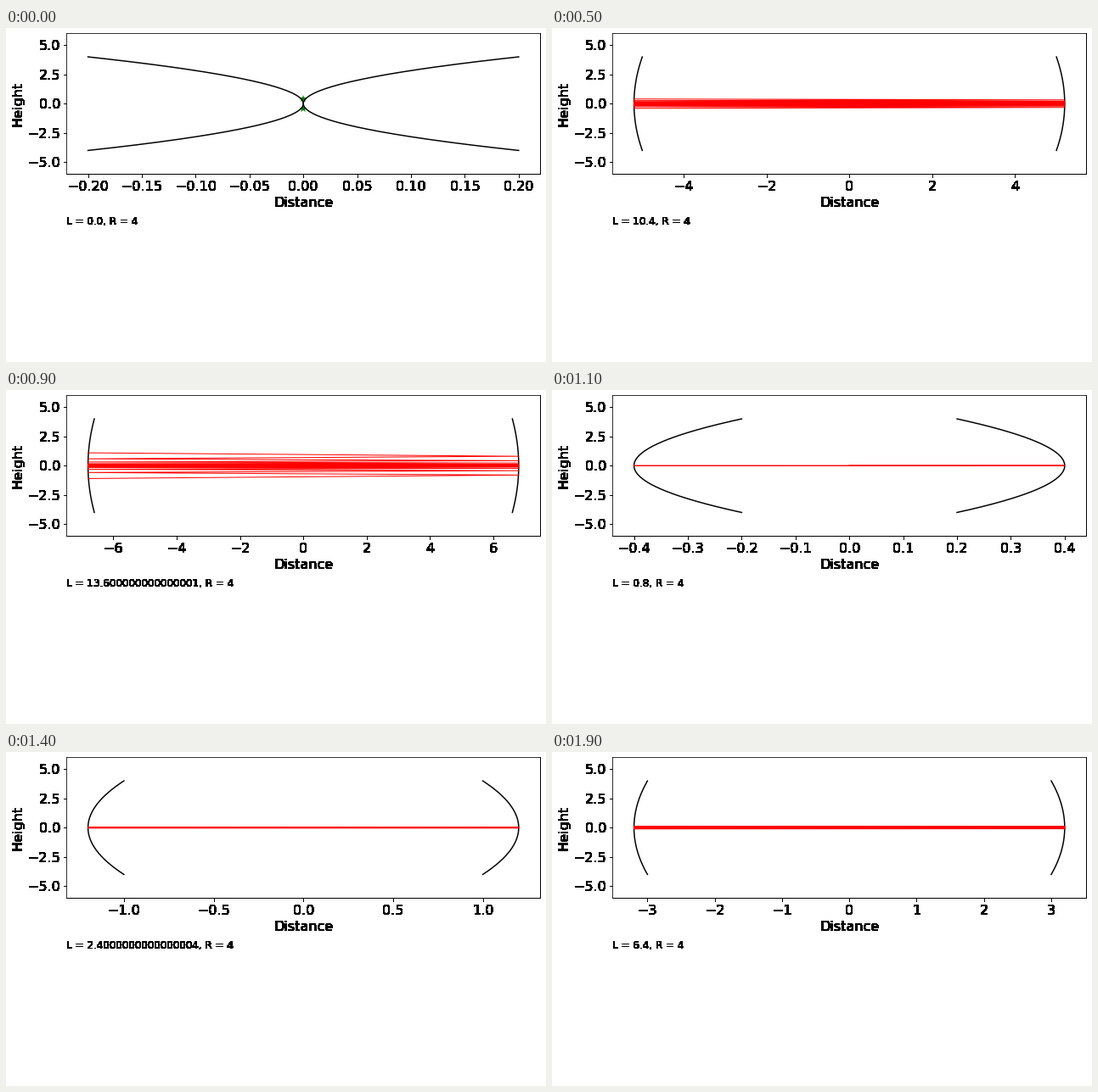
These frames come from a looping animation (636x394 px, 2 s). A matplotlib script:

```python
import numpy as np
import matplotlib.pyplot as plt
from matplotlib.animation import FuncAnimation

W, H, DPI = 636, 394, 72
LEFT, BOTTOM, WIDTH, HEIGHT = 71.2, 221.95, 558, 165.6
STEP = 0.8
RADIUS = 4
BOUNCES = 12

plt.rcParams.update({"font.family": "DejaVu Sans", "font.size": 16})

# Cavity steps play in alphabetical order of their 1-based number.
order = sorted(range(20), key=lambda i: str(i + 1))


def harden(img, dpi):
    """Give every touched pixel full ink, for hard-edged lettering."""
    out = img.copy()
    out[..., :3] = 0
    out[..., 3] = img[..., 3] > 0
    return out, 0, 0


fig = plt.figure(figsize=(W / DPI, H / DPI), dpi=DPI, facecolor="white")
ax = fig.add_axes([LEFT / W, BOTTOM / H, WIDTH / W, HEIGHT / H])
ax.set_ylim(-6, 6)
ax.set_xlabel("Distance")
ax.set_ylabel("Height")
ax.tick_params(axis="x", pad=4)
caption = fig.text(LEFT / W, 162 / H, "", fontsize=12, va="baseline")
for part in (ax.xaxis, ax.yaxis, caption,
             ax.spines["right"], ax.spines["bottom"]):
    part.set_agg_filter(harden)

height = np.linspace(-4, 4, 201)
sag = 0.2 * (height / 4) ** 2
mirrors = [(side, ax.plot([], [], "k", lw=1.5, zorder=2.2)[0])
           for side in (-1, 1)]
rays = [(sign, ax.plot([], [], color="red", lw=1, zorder=2.3)[0])
        for sign in (-1, 1)]
sparks, = ax.plot([0, 0], [-0.45, 0.45], "*", color="green", ms=9, mew=0,
                  zorder=2.1)


def ray_path(length):
    """Zigzag from the centre, spreading by a constant factor per pass."""
    reach = np.interp(length, [0, 0.8, 2.4, 6.4, 8.8, 12, 13.6, 15.2],
                      [0, 0.01, 0.03, 0.11, 0.19, 0.61, 1.1, 1.95])
    growth = np.interp(length, [0, 8.8, 12, 13.6, 15.2],
                       [1.1, 1.2, 1.27, 1.37, 1.45])
    count = 2 if length < 1 else BOUNCES
    k = np.arange(count)
    x = length / 2 * (-1.0) ** k
    y = reach * growth ** (k - count + 1.0)
    return np.r_[0, x], np.r_[0, y]


def draw(frame):
    length = order[frame] * STEP
    limit = 1.1 * max(length / 2, 0.2)
    ax.set_xlim(-limit, limit)
    caption.set_text(f"L = {length}, R = {RADIUS}")
    for side, line in mirrors:
        line.set_data(side * (length / 2 - sag), height)
    x, y = ray_path(length)
    for sign, line in rays:
        line.set_data(x, sign * y)
        line.set_visible(length > 0)
    sparks.set_visible(length == 0)
    return []


def reset():
    return draw(0)


anim = FuncAnimation(fig, draw, frames=len(order), init_func=reset,
                     interval=100, repeat=True, repeat_delay=0, blit=False)
plt.show()
```
